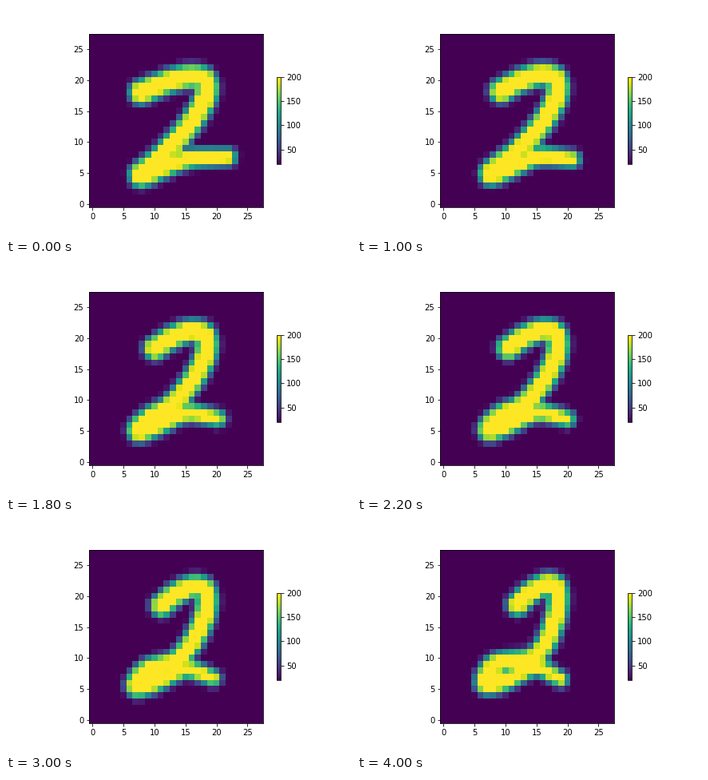
Write a matplotlib script that moves like this. It is 432 by 288 pixels and loops after 4.2 s.

```python
import numpy as np
import matplotlib.pyplot as plt
from matplotlib.animation import FuncAnimation

SIZE = 28
FRAMES = 21
INTERVAL = 200
SOFTNESS = 0.48

# Pen path: hook, stem, lower turn, tail.
START = np.array([
    (7.9, 18.0), (11.3, 19.4), (15.2, 20.5), (18.0, 20.1), (18.4, 17.8),
    (17.0, 14.8), (14.9, 11.8), (12.0, 8.6), (10.0, 6.6), (7.9, 4.7),
    (11.5, 6.0), (15.5, 7.3), (21.8, 7.6),
])
END = np.array([
    (12.0, 18.6), (14.0, 20.5), (16.6, 21.9), (18.3, 21.2), (18.4, 18.0),
    (17.4, 14.5), (16.1, 11.8), (14.0, 9.9), (8.6, 9.0), (6.9, 6.0),
    (10.0, 6.4), (14.8, 8.5), (18.9, 6.6),
])
along = np.linspace(0, 1, len(START))[:, None]
# Both ends of the path move early, the lower turn opens late.
easing = 0.75 + 1.2 * np.sin(np.pi * along) ** 2

rows, cols = np.mgrid[:SIZE, :SIZE]


def smooth_path(points, samples=321):
    """Cubic Hermite curve through the points."""
    u = np.linspace(0, len(points) - 1, samples)
    i = np.minimum(u.astype(int), len(points) - 2)
    f = (u - i)[:, None]
    slope = np.gradient(points, axis=0)
    blend = f * f * (3 - 2 * f)
    return (points[i] * (1 - blend) + points[i + 1] * blend
            + slope[i] * f * (1 - f) ** 2 - slope[i + 1] * f * f * (1 - f))


def digit(frame):
    """Grey levels of the soft pen stroke at one moment."""
    t = frame / (FRAMES - 1)
    path = smooth_path(START + (END - START) * t ** easing)
    x, y = path.T
    u = np.linspace(0, 1, len(path))
    radius = np.interp(u, [0, 0.6, 0.75, 1], [1.6, 1.45, 1.65, 1.0])
    radius += 0.15 * (1 - t)
    distance = np.hypot(cols[..., None] - x, rows[..., None] - y)
    return 255 / (1 + np.exp((distance - radius).min(axis=-1) / SOFTNESS))


plt.rcParams.update({
    "font.family": "DejaVu Sans",
    "font.size": 10,
    "figure.subplot.bottom": 0.125,
    "figure.subplot.top": 0.88,
})
fig, ax = plt.subplots(figsize=(6, 4), dpi=72)
image = ax.imshow(digit(0), origin="lower", cmap="viridis",
                  interpolation="nearest", vmin=20, vmax=200)
ax.set_xticks(range(0, SIZE, 5))
ax.set_yticks(range(0, SIZE, 5))
fig.colorbar(image, ax=ax, shrink=0.5, ticks=range(50, 201, 50))


def update(frame):
    image.set_data(digit(frame))
    return [image]


anim = FuncAnimation(fig, update, frames=FRAMES, interval=INTERVAL,
                     repeat=True, repeat_delay=0)
plt.show()
```
